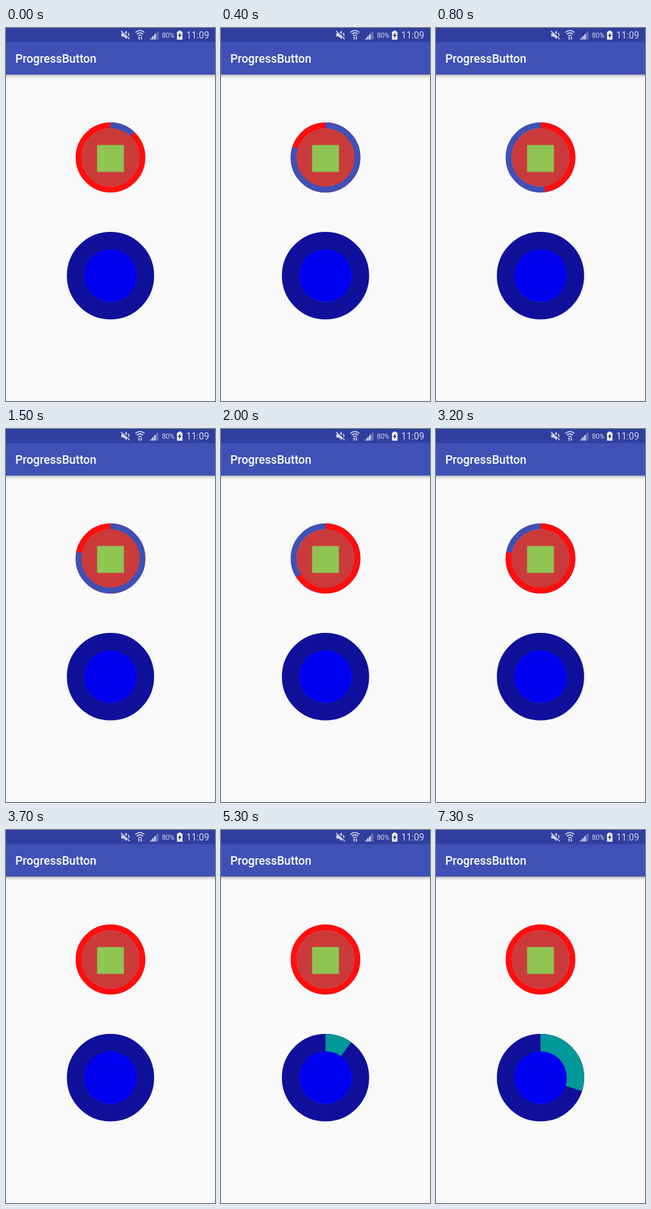
Recreate the animation shown at these times as an HTML page. Size 320x569 px, loop 8000 ms.

```html
<!DOCTYPE html>
<html lang="en">
<head>
<meta charset="utf-8">
<title>Progress rings</title>
<style>
  html, body { margin: 0; width: 100%; height: 100%; overflow: hidden; background: #f9f9f9; }
  svg { display: block; width: 100vw; height: 100vh; }
  text { font-family: Roboto, sans-serif; }
  .line { fill: none; stroke: #d3d7ec; stroke-width: 1.5; }
  .fill { fill: #d3d7ec; }
</style>
</head>
<body>
<svg viewBox="0 0 320 569">
  <defs>
    <linearGradient id="shade" x2="0" y2="1">
      <stop stop-color="#000" stop-opacity=".3"/>
      <stop offset=".4" stop-color="#000" stop-opacity=".11"/>
      <stop offset="1" stop-color="#000" stop-opacity="0"/>
    </linearGradient>
  </defs>
  <rect width="320" height="569" fill="#f9f9f9"/>
  <rect y="71" width="320" height="6" fill="url(#shade)"/>
  <rect width="320" height="71" fill="#3f51b5"/>
  <rect width="320" height="21.5" fill="#303f9f"/>
  <text x="14.2" y="53" font-size="17.78" font-weight="500" fill="#fff">ProgressButton</text>

  <!-- muted speaker -->
  <path class="fill" d="M176.5 8h3.5l5-4v13l-5-4h-3.5z"/>
  <path class="line" d="M187 7.5q2.5 3 0 6"/>
  <path d="M177 4.2L190.5 17" stroke="#303f9f" stroke-width="3"/>
  <path class="line" d="M176 4.5L189.5 17"/>
  <!-- wireless -->
  <path class="line" d="M198 6.7q7-6 14 0M200.2 9.4q4.8-4 9.6 0M202.4 12q2.6-2 5.2 0"/>
  <path class="fill" d="M202 15l1.7-2.3 1.7 2.3h-1v3h-1.4v-3zM205.6 15.7l1.7 2.3 1.7-2.3h-1v-3h-1.4v3z"/>
  <!-- signal -->
  <path d="M220 17.5L233.5 4v13.5z" fill="#6570b6"/>
  <path class="fill" d="M220 17.5l2.5-2.5v2.5zM223.5 17.5V14l2.3-2.3v5.8zM226.8 17.5v-6.8l2.3-2.3v9.1z"/>
  <text class="fill" x="238.7" y="15" font-size="10.4">80%</text>
  <!-- battery -->
  <path d="M264 4h4v1.5h2.2v12.2h-8.4V5.500h2.200z" fill="#f2f3fa"/>
  <path d="M267.300 6.500l-4 5.500h2.500l-1.200 4.200 4.200-5.700h-2.500z" fill="#20264f"/>
  <text class="fill" x="276" y="16" font-size="14.1">11:09</text>

  <g id="top" fill="none" stroke-width="9.2" transform="rotate(-90 160 197.5)">
    <circle cx="160" cy="197.500" r="48.800"/>
    <circle cx="160" cy="197.500" r="48.800" pathLength="1"/>
  </g>
  <circle cx="160" cy="197.500" r="44.500" fill="#cb3a3a"/>
  <rect x="139.500" y="178.500" width="41" height="41" fill="#8fc552"/>

  <g id="bottom" fill="none" stroke-width="27" transform="rotate(-90 160 377.8)">
    <circle cx="160" cy="377.800" r="53.300" stroke="#10109a"/>
    <circle cx="160" cy="377.800" r="53.300" stroke="#009898" pathLength="1"/>
  </g>
  <circle cx="160" cy="377.800" r="40.300" fill="#0000f0"/>
</svg>
<script>
const LOOP = 8000, RED = '#ff0e0e', BLUE = '#3f51b5';
const [topBase, topArc] = document.querySelectorAll('#top circle');
const bottomArc = document.querySelectorAll('#bottom circle')[1];

// [ms, turns]: whole turns alternate blue over red and red over blue
const spin = [[0, .12], [800, 1.48], [1500, 2.78], [2500, 4.54], [3200, 5.78], [3600, 6.58]];

function turnsAt(t) {
  const i = Math.max(1, spin.findIndex(([ms]) => ms >= t));
  const [t0, v0] = spin[i - 1], [t1, v1] = spin[i];
  return v0 + (v1 - v0) * (t - t0) / (t1 - t0);
}

function setArc(arc, part) {
  arc.style.visibility = part > 0 ? 'visible' : 'hidden';
  arc.setAttribute('stroke-dasharray', `${part} 2`);
}

function draw(t) {
  const step = Math.floor(t / 100) * 100;
  const turns = step < 3700 ? turnsAt(step) : 0;
  const odd = Math.floor(turns) % 2;
  topBase.setAttribute('stroke', odd ? BLUE : RED);
  topArc.setAttribute('stroke', odd ? RED : BLUE);
  setArc(topArc, turns % 1);
  setArc(bottomArc, Math.max(0, Math.floor((t - 4300) / 1000)) / 10);
}

const start = performance.now();
function tick() {
  draw((performance.now() - start) % LOOP);
  requestAnimationFrame(tick);
}
tick();
</script>
</body>
</html>
```
